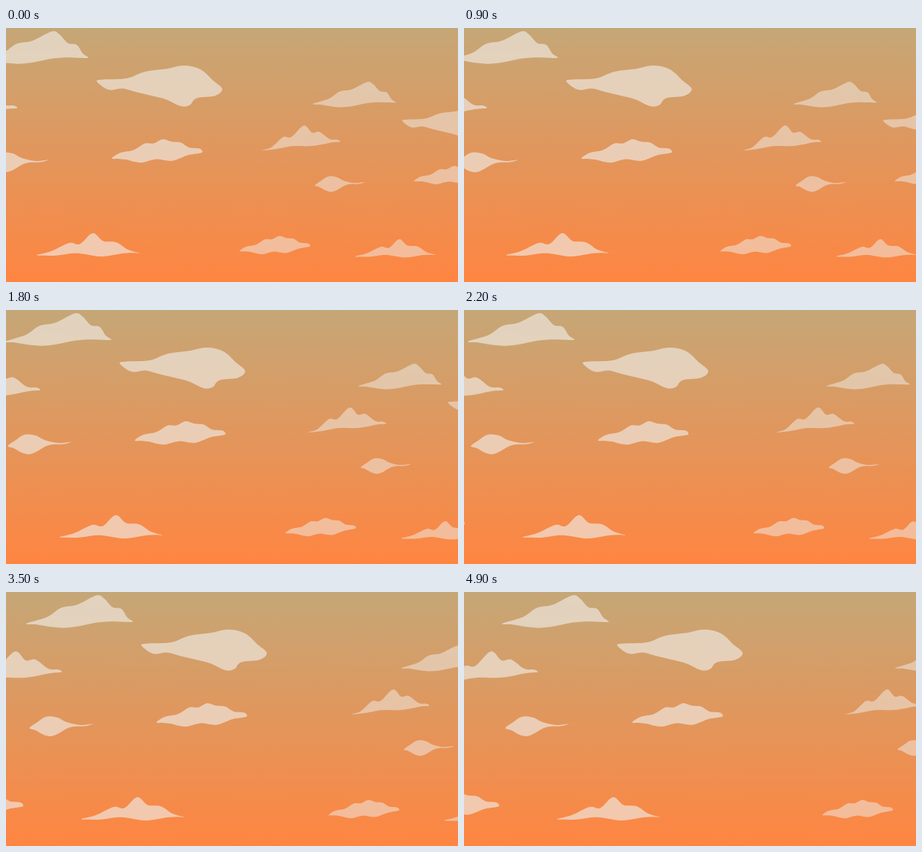
Write an HTML page with a canvas that moves like this. It is 600 by 338 pixels and loops after 5 s.

```html
<!DOCTYPE html>
<html lang="en">
<head>
<meta charset="utf-8">
<title>Sunset clouds</title>
<style>
  html, body { margin: 0; width: 100%; height: 100%; overflow: hidden; }
  canvas { display: block; width: 100%; height: 100%; }
</style>
</head>
<body>
<canvas id="sky" width="600" height="338"></canvas>
<script>
const W = 600, H = 338, LOOP = 5000, STEP = 100;
const ctx = document.getElementById('sky').getContext('2d');

const parse = text => text.split(' ').map(p => p.split(',').map(Number));

// Underside from the right tip back to the left: a sagging line with ripples
function belly([x0, y0], [x1, y1], { sag, ripple, waves, peak }) {
  const pts = [], n = 12;
  for (let i = n - 1; i > 0; i--) {
    const u = i / n;
    const bulge = sag + ripple * Math.cos(2 * Math.PI * waves * (u - peak));
    pts.push([x0 + (x1 - x0) * u, y0 + (y1 - y0) * u + Math.sin(Math.PI * u) * bulge]);
  }
  return pts;
}

// Closed smooth curve through the points
function smooth(pts) {
  const n = pts.length, at = i => pts[(i + n) % n], path = new Path2D();
  path.moveTo(...pts[0]);
  for (let i = 0; i < n; i++) {
    const a = at(i - 1), b = at(i), c = at(i + 1), d = at(i + 2);
    path.bezierCurveTo(
      b[0] + (c[0] - a[0]) / 6, b[1] + (c[1] - a[1]) / 6,
      c[0] - (d[0] - b[0]) / 6, c[1] - (d[1] - b[1]) / 6,
      c[0], c[1]);
  }
  path.closePath();
  return path;
}

// Key points run from the left tip over the top; the belly rule closes the shape
function cloud(text, under) {
  const top = parse(text);
  return smooth(under ? top.concat(belly(top[0], top[top.length - 1], under)) : top);
}

const ridge = cloud('-32,42 -4,33 14,21 35,17 61,4.6 71,8.5 82,20 94,22.5 102,34 109.5,39.5',
  { sag: 3.3, ripple: 4.5, waves: 0.95, peak: 0.28 });
const puff = cloud('140.5,173.5 152,166 169,162.5 184,153.8 196,153.5 208,148 220,151.3 232,152.5 243,159 257,160.5 260.5,165.5',
  { sag: 7.5, ripple: 2.5, waves: 2.6, peak: 0.68 });
const wave = cloud('41,302 60,297 84,286 98,287.5 115,273 129,283.5 146,285 162,295 177,299.5',
  { sag: 1.3, ripple: 2.8, waves: 1.75, peak: 0.65 });
const peak = cloud('-118,121 -102,116 -82,98.5 -68,98.5 -47,79 -33,91 -20,90 -3,102 10,103.3 15,106.5',
  { sag: 0.6, ripple: 2, waves: 1.6, peak: 0.68 });
const fish = cloud('-28,181 -18,173.5 -6,166 9,167 21,173 40,177 56,175.5',
  { sag: 9, ripple: 6.8, waves: 1.1, peak: 0.25 });
const whale = cloud('120.5,71 130,68.5 160,67 185,58 212,54.5 236,50 258,55 275,70 287,81 ' +
  '278,90 253,93.5 244,102.5 232,104 212,95 191,89.5 172,85 155,80.5 136,82');

const clouds = new Path2D();
for (const shape of [ridge, puff, wave, peak, fish, whale]) clouds.addPath(shape);
clouds.addPath(puff, new DOMMatrix().translate(-297, 119.5));

// The same bank of clouds drifts twice, once smaller and faster
const layers = [
  { x: 0, y: 0, scale: 1, speed: 16.9, alpha: 0.65 },
  { x: 432, y: 68.2, scale: 0.78, speed: 33.8, alpha: 0.53 }
];

const dusk = ctx.createLinearGradient(0, 0, 0, H);
dusk.addColorStop(0, '#c5a777');
dusk.addColorStop(1, '#ff8541');

function draw(ms) {
  const t = Math.floor((ms % LOOP) / STEP) * STEP / 1000;
  ctx.fillStyle = dusk;
  ctx.fillRect(0, 0, W, H);
  ctx.fillStyle = '#f0ebe5';
  for (const l of layers) {
    ctx.save();
    ctx.globalAlpha = l.alpha;
    ctx.translate(l.x + l.speed * t, l.y);
    ctx.scale(l.scale, l.scale);
    ctx.fill(clouds);
    ctx.restore();
  }
}

const start = performance.now();
function tick() {
  draw(performance.now() - start);
  requestAnimationFrame(tick);
}
tick();
</script>
</body>
</html>
```
